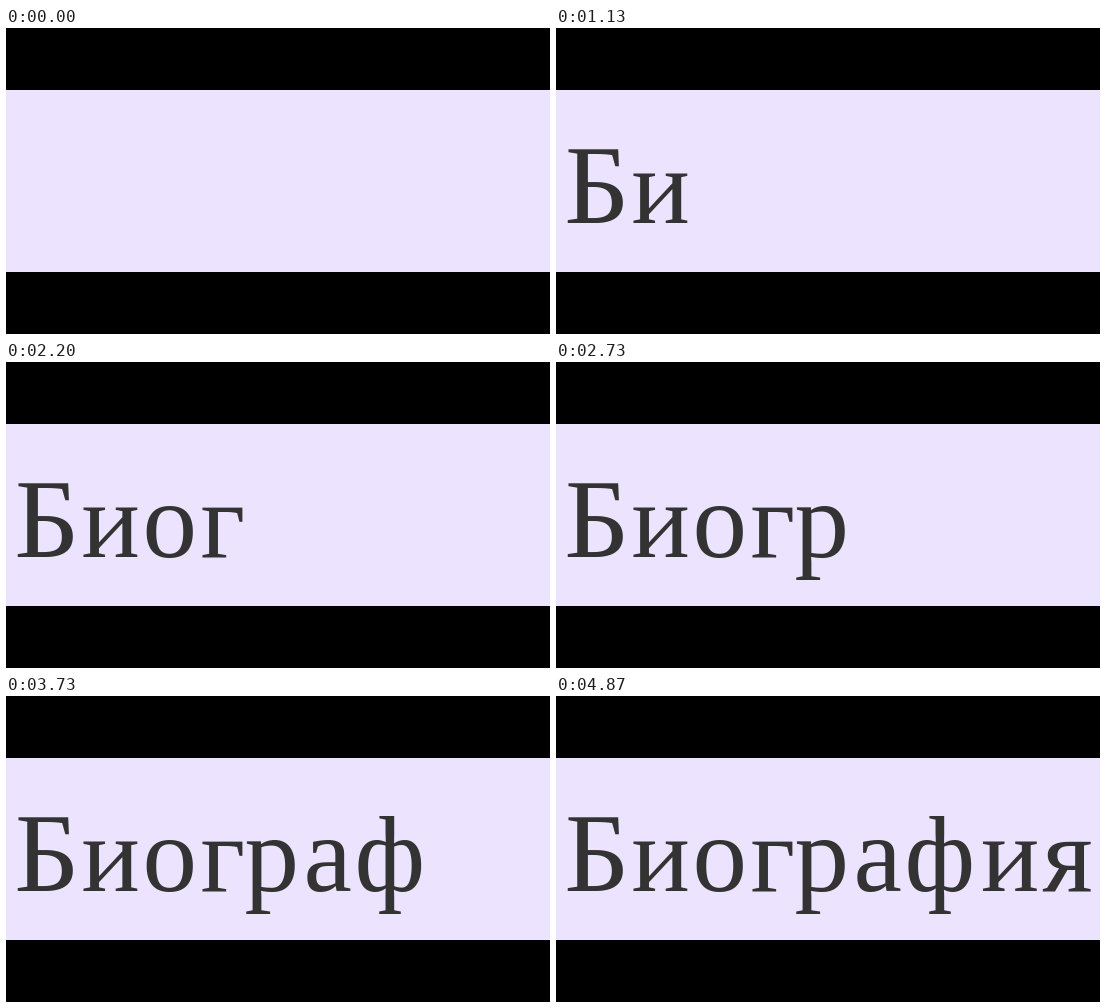
Write an HTML page with a canvas that moves like this. It is 544 px wide and 306 px high and loops after 5.39 s.

```html
<!DOCTYPE html>
<html lang="ru">
<head>
<meta charset="utf-8">
<title>Биография</title>
<style>
  html, body { margin: 0; width: 100%; height: 100%; overflow: hidden; background: #000; }
  canvas { display: block; width: 544px; height: 306px; }
</style>
</head>
<body>
<canvas id="stage" width="544" height="306"></canvas>
<script>
const ctx = document.getElementById('stage').getContext('2d');
const LOOP = 5390;
const BASELINE = 195;
const CAPITAL = 113;
const SMALL = 109;

// Each letter: character, ink centre, time it appears in ms
const letters = [
  ['Б', 39.5, 530],
  ['и', 104, 1130],
  ['о', 164, 1670],
  ['г', 216, 2200],
  ['р', 264.5, 2730],
  ['а', 322.5, 3270],
  ['ф', 383.5, 3730],
  ['и', 453.5, 4330],
  ['я', 511, 4870]
];

function drawLetter(char, centre, size) {
  ctx.font = `${size}px "Liberation Serif", serif`;
  const m = ctx.measureText(char);
  const inkOffset = (m.actualBoundingBoxRight - m.actualBoundingBoxLeft) / 2;
  ctx.fillText(char, centre - inkOffset, BASELINE);
}

function draw(t) {
  ctx.fillStyle = '#000';
  ctx.fillRect(0, 0, 544, 306);
  ctx.fillStyle = '#ece4ff';
  ctx.fillRect(0, 62, 544, 182);

  ctx.fillStyle = '#333';
  letters.forEach(([char, centre, start], i) => {
    if (t >= start) drawLetter(char, centre, i ? SMALL : CAPITAL);
  });
}

const begin = performance.now();
function tick() {
  draw((performance.now() - begin) % LOOP);
  requestAnimationFrame(tick);
}
tick();
</script>
</body>
</html>
```
